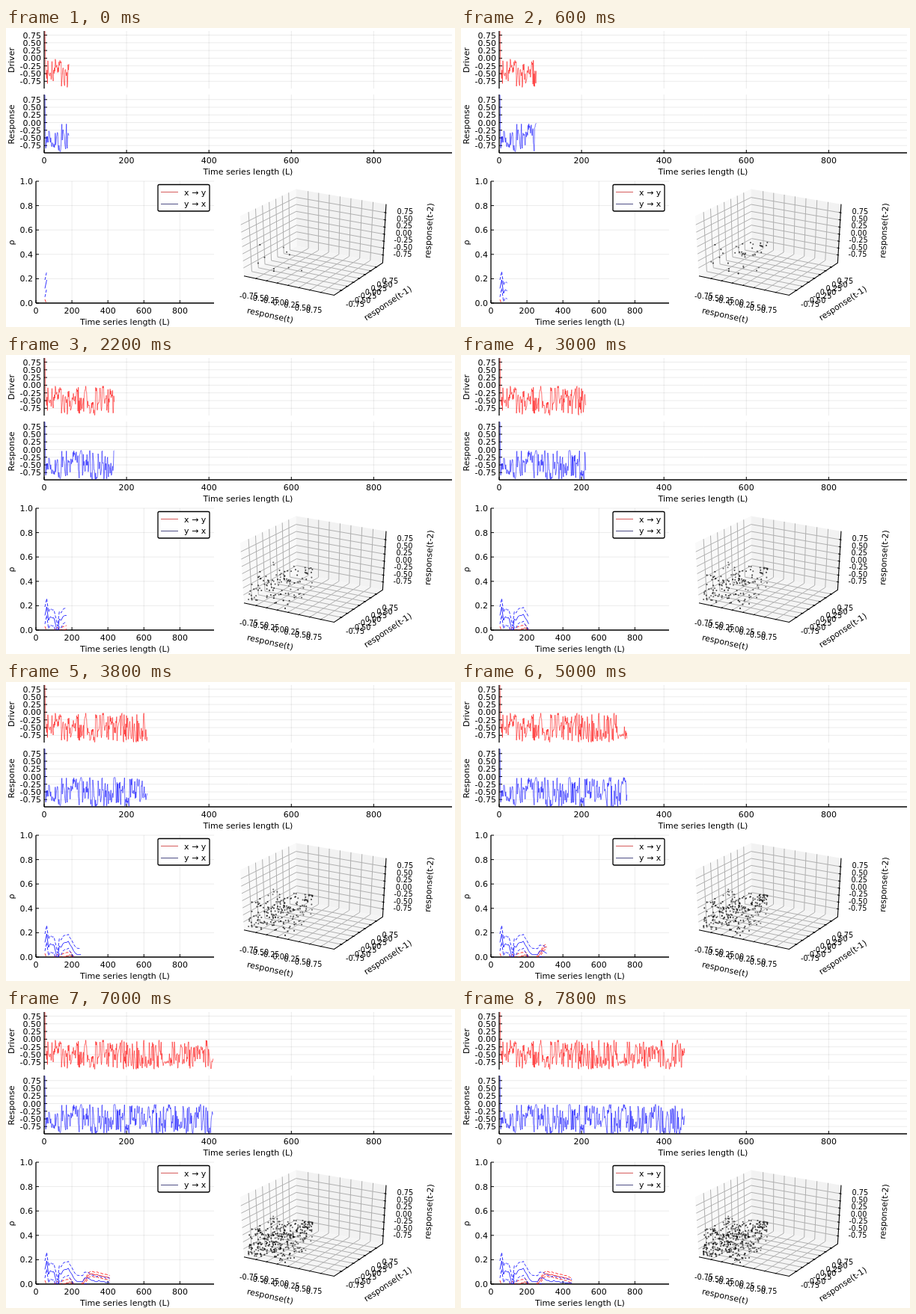
These frames come from a looping animation (600 by 400 pixels, 8000 ms). An HTML page with a canvas:

```html
<!DOCTYPE html>
<html lang="en">
<head>
<meta charset="utf-8">
<title>Coupled time series</title>
<style>
html, body { margin: 0; width: 100%; height: 100%; overflow: hidden; background: #fff; }
canvas { display: block; }
</style>
</head>
<body>
<canvas id="stage" width="600" height="400"></canvas>
<script>
const ctx = document.getElementById('stage').getContext('2d');
const LOOP = 8000, STEP = 200, MAX_L = 450;
const TICKS = [-0.75, -0.5, -0.25, 0, 0.25, 0.5, 0.75];

// ---------- data ----------
let seed = 11;
function random() {
  seed = (seed + 0x6D2B79F5) | 0;
  let t = Math.imul(seed ^ (seed >>> 15), 1 | seed);
  t = (t + Math.imul(t ^ (t >>> 7), 61 | t)) ^ t;
  return ((t ^ (t >>> 14)) >>> 0) / 4294967296;
}

// Irregular signal in 0..1: either drifts from its last value or jumps.
function nextValue(u) {
  const drift = u + (random() - 0.5) * 0.45;
  const jump = random();
  return random() < 0.45 ? Math.min(0.97, Math.max(0.03, drift)) : 0.03 + 0.94 * jump;
}

const driver = [0.9, 0.9, 0.9, 0];
const response = [0.9, 0.9, 0.9, -0.3];
for (let n = 4, u = 0.3, w = 0.6; n <= MAX_L; n++) {
  const calm = n > 289 && n < 304;
  u = calm ? 0.75 + 0.12 * (random() - 0.5) : nextValue(u);
  w = nextValue(w);
  driver.push(-u);
  response.push(n < 38 ? -0.2 - 0.77 * w : -w);
}

// Mean skill in percent, every 10 samples from L = 50.
const skillYX = [12, 19, 8, 11, 10, 10, 4, -3, 9, 8, 11, 12, 12, 13, 10, 8, 5, 3, 2, 2, 2,
  2, 5, 5, 5, 4, 3, 3, 2, 2, 3, 2, 2, 2, 1, 2, 1, 1, 1, 1, 1];
const skillXY = [-1, -5, -6, -6, -5, -4, -2, -1, -4, -2, 0, 0, 1, 1, 2, 0, -2, -3, -5, -5, -4,
  0, 2, 4, 7, 8, 8.5, 8, 7.5, 8, 7, 7, 6.5, 6, 6, 5.5, 5, 5, 4, 3.5, 2.5];

// ---------- drawing helpers ----------
function line(points, color, width = 1, dash = []) {
  ctx.beginPath();
  points.forEach(([x, y]) => ctx.lineTo(x, y));
  ctx.strokeStyle = color;
  ctx.lineWidth = width;
  ctx.setLineDash(dash);
  ctx.stroke();
  ctx.setLineDash([]);
}

function text(str, x, y, { align = 'center', size = 11, angle = 0 } = {}) {
  ctx.save();
  ctx.translate(x, y);
  ctx.rotate(angle * Math.PI / 180);
  ctx.font = `${size}px "DejaVu Sans", sans-serif`;
  ctx.textAlign = align;
  ctx.fillStyle = '#000';
  ctx.fillText(str, 0, size * 0.365);
  ctx.restore();
}

function clipped(box, draw) {
  ctx.save();
  ctx.beginPath();
  ctx.rect(box.left, box.top, box.right - box.left, box.bottom - box.top);
  ctx.clip();
  draw();
  ctx.restore();
}

// ---------- flat plots ----------
const driverBox = { left: 51, right: 596, top: 4, bottom: 81, kx: 0.5505, zero: 40.4, ky: 41.2,
  ticks: TICKS, digits: 2, label: 'Driver', labelY: 43 };
const responseBox = { left: 51, right: 596, top: 89, bottom: 167, kx: 0.5505, zero: 126.5, ky: 41,
  ticks: TICKS, digits: 2, label: 'Response', labelY: 129, timeAxis: true };
const skillBox = { left: 40, right: 278, top: 205, bottom: 368, kx: 0.2405, zero: 368, ky: 163,
  ticks: [0, 0.2, 0.4, 0.6, 0.8, 1], digits: 1, label: 'ρ', labelY: 287, timeAxis: true };

const toScreen = (box, n, v) => [box.left + n * box.kx, box.zero - v * box.ky];

function drawAxes(box) {
  const { left, right, top, bottom } = box, grid = 'rgba(0,0,0,.1)';
  for (const v of box.ticks) {
    const y = toScreen(box, 0, v)[1];
    line([[left, y], [right, y]], grid, 0.8);
    line([[left, y], [left + 4, y]], '#000');
    text(v.toFixed(box.digits), left - 4, y, { align: 'right' });
  }
  for (let n = 0; n <= 800; n += 200) {
    const x = toScreen(box, n, 0)[0];
    if (n) line([[x, top], [x, bottom]], grid, 0.8);
    if (!box.timeAxis) continue;
    line([[x, bottom], [x, bottom - 4]], '#000');
    text(n, x, bottom + 9.5);
  }
  line([[left, top], [left, bottom]], '#000', 1.3);
  if (box.timeAxis) {
    line([[left, bottom], [right, bottom]], '#000', 1.3);
    text('Time series length (L)', (left + right) / 2, bottom + 24.5);
  }
  text(box.label, 7, box.labelY, { angle: -90 });
}

function drawSeries(box, values, length, color) {
  clipped(box, () => line(values.slice(1, length + 1).map((v, i) => toScreen(box, i + 1, v)), color, 0.55));
}

function drawSkill(means, length, color, spread, finalSpread) {
  const count = (length - 50) / 10 + 1;
  clipped(skillBox, () => {
    for (const side of [-1, 0, 1]) {
      const points = means.slice(0, count).map((m, i) => {
        const width = Math.max(finalSpread, spread - i * 0.1);
        return toScreen(skillBox, 50 + i * 10, (m + side * width) / 100);
      });
      line(points, color, 0.8, side ? [4, 2] : []);
    }
  });
}

function drawLegend() {
  ctx.beginPath();
  ctx.roundRect(203, 209.5, 69, 35.5, 2);
  ctx.fillStyle = '#fff';
  ctx.fill();
  ctx.strokeStyle = '#000';
  ctx.lineWidth = 1.3;
  ctx.stroke();
  line([[207, 219.5], [230, 219.5]], '#c33', 0.8);
  line([[207, 235.5], [230, 235.5]], '#226', 0.8);
  text('x → y', 238, 220, { align: 'left' });
  text('y → x', 238, 235, { align: 'left' });
}

// ---------- 3D plot: perspective view, elevation 30°, azimuth -60° ----------
const EDGE = 1.04; // half the cube's side in data units
const depth = (x, y, z) => (0.433 * x - 0.75 * y + 0.5 * z) / (2 * EDGE);

function project(x, y, z) {
  const scale = 10 / (10 - depth(x, y, z)) / (2 * EDGE);
  return [
    412.1 + 139.1 * scale * (0.866 * x + 0.5 * y),
    284.1 - 91.55 * scale * (-0.25 * x + 0.433 * y + 0.866 * z)
  ];
}

const path3d = (corners) => corners.map((c) => project(...c));

function drawPane(corners, color) {
  ctx.beginPath();
  path3d(corners).forEach(([x, y]) => ctx.lineTo(x, y));
  ctx.fillStyle = color;
  ctx.fill();
}

function drawCube() {
  const lo = -EDGE, hi = EDGE;
  drawPane([[lo, lo, lo], [lo, hi, lo], [lo, hi, hi], [lo, lo, hi]], '#f9f9f9');
  drawPane([[lo, hi, lo], [hi, hi, lo], [hi, hi, hi], [lo, hi, hi]], '#f2f2f2');
  drawPane([[lo, lo, lo], [hi, lo, lo], [hi, hi, lo], [lo, hi, lo]], '#f5f5f5');
  for (const t of TICKS) {
    line(path3d([[t, lo, lo], [t, hi, lo], [t, hi, hi]]), '#b0b0b0');
    line(path3d([[hi, t, lo], [lo, t, lo], [lo, t, hi]]), '#b0b0b0');
    line(path3d([[lo, lo, t], [lo, hi, t], [hi, hi, t]]), '#b0b0b0');
  }
  line(path3d([[lo, lo, lo], [hi, lo, lo], [hi, hi, lo], [hi, hi, hi]]), '#000', 1.1);
  const inner = hi - 0.035, outer = hi + 0.02;
  for (const t of TICKS) {
    line(path3d([[t, -inner, lo], [t, -outer, lo]]), '#000');
    line(path3d([[inner, t, lo], [outer, t, lo]]), '#000');
    line(path3d([[inner, hi, t], [outer, hi, t]]), '#000');
    const label = ([x, y], dx, dy) => text(t.toFixed(2), x + dx, y + dy, { size: 9.7 });
    label(project(t, lo, lo), -9.5, 23.5);
    label(project(hi, t, lo), 18.5, 18.5);
    label(project(hi, hi, t), 26, -1.5);
  }
  text('response(t)', 353, 384, { angle: 12.2 });
  text('response(t-1)', 510, 368, { angle: -33.6 });
  text('response(t-2)', 565, 271, { angle: -86.7 });
}

function drawCloud(length) {
  for (let n = 51; n <= length; n++) {
    const p = [response[n], response[n - 1], response[n - 2]];
    const alpha = Math.min(1, Math.max(0.3, 0.7 + depth(...p)));
    ctx.fillStyle = `rgba(0,0,0,${alpha})`;
    ctx.beginPath();
    ctx.arc(...project(...p), 1.05, 0, 2 * Math.PI);
    ctx.fill();
  }
}

// ---------- animation ----------
function draw(length) {
  ctx.fillStyle = '#fff';
  ctx.fillRect(0, 0, 600, 400);
  [driverBox, responseBox, skillBox].forEach(drawAxes);
  drawSeries(driverBox, driver, length, '#f00');
  drawSeries(responseBox, response, length, '#00f');
  drawSkill(skillXY, length, '#f00', 4, 2);
  drawSkill(skillYX, length, '#00f', 7, 3);
  drawLegend();
  drawCube();
  drawCloud(length);
}

let shown = 0;
function tick() {
  const length = 60 + 10 * Math.floor((performance.now() % LOOP) / STEP);
  if (length !== shown) draw(shown = length);
  requestAnimationFrame(tick);
}
tick();
</script>
</body>
</html>
```
